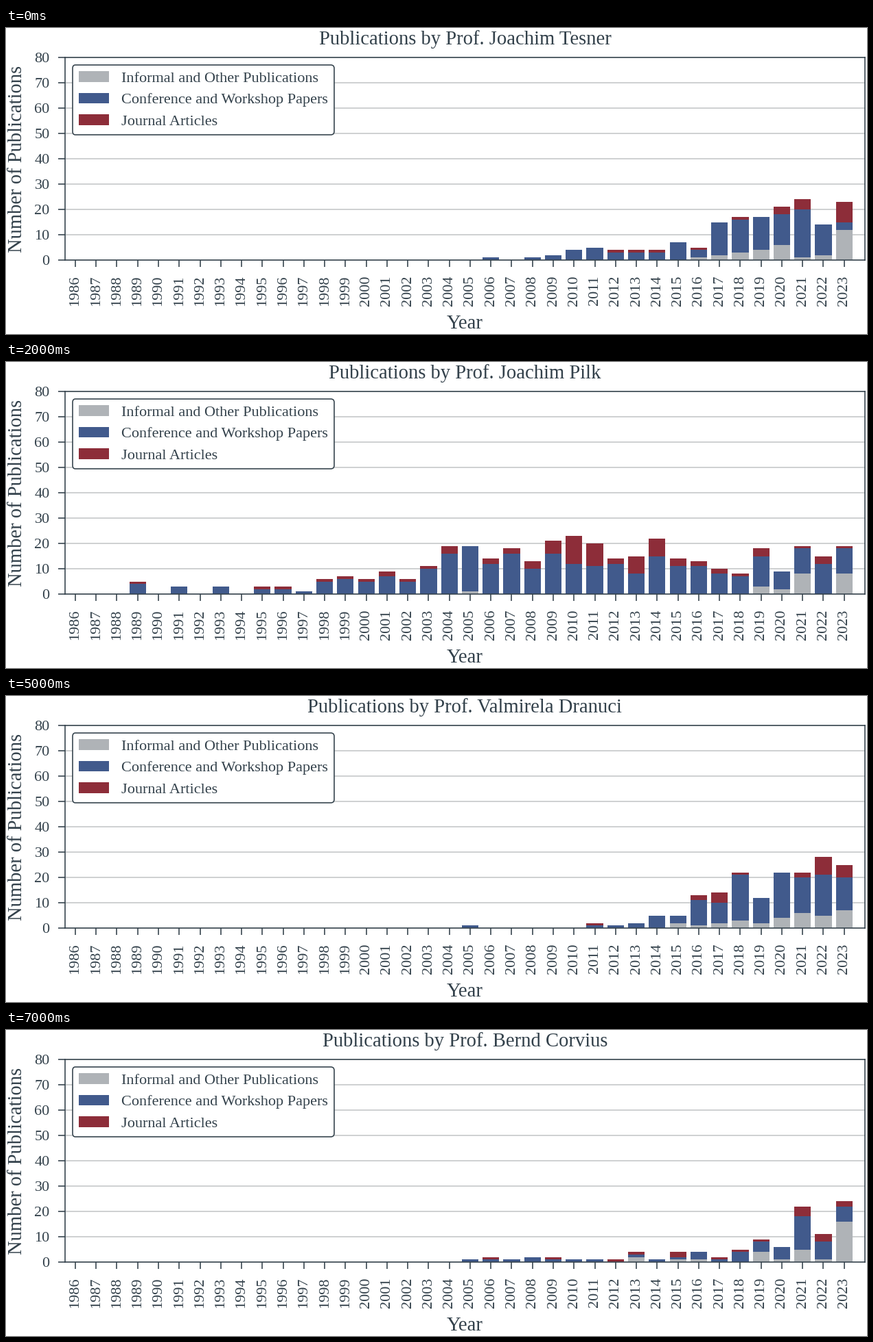
A matplotlib script that plays this animation: 1254 by 447 pixels, repeating every 8 s.

```python
import numpy as np
import matplotlib.pyplot as plt
from matplotlib.animation import FuncAnimation

W, H, DPI = 1254, 447, 64
PT = 72 / DPI  # points per pixel

DARK = "#33414b"
GRID = "#c4c6c8"
KINDS = {
    "Informal and Other Publications": "#afb3b7",
    "Conference and Workshop Papers": "#415a8c",
    "Journal Articles": "#8d2d39",
}
BIG, SMALL, LINE = 28.6 * PT, 22.25 * PT, 1.6 * PT

LEFT, RIGHT, TOP, BOTTOM = 85.8, 1251, 43, 339
YEARS = np.arange(1986, 2024)

people = []


def add(name, informal, conference, journal):
    """Store yearly counts; each list ends in the last year."""
    counts = np.zeros((3, len(YEARS)))
    for row, values in zip(counts, (informal, conference, journal)):
        row[len(YEARS) - len(values):] = values
    people.append((name, counts))


add("Joachim Tesner",
    [1, 2, 3, 4, 6, 1, 2, 12],
    [1, 0, 1, 2, 4, 5, 3, 3, 3, 7, 3, 13, 13, 13, 12, 19, 12, 3],
    [1, 1, 1, 0, 1, 0, 1, 0, 3, 4, 0, 8])

add("Joachim Olmering",
    [1, 0, 0, 1, 0],
    [1, 0, 1, 2, 1, 1, 2, 3, 2, 4, 3, 2, 4, 5, 3, 4, 4,
     5, 3, 4, 2, 3, 3, 2, 4, 2, 3, 2, 2, 1, 2, 1, 1, 0],
    [1, 0, 1, 0, 1, 1, 0, 1, 2, 1, 0, 1, 1, 2, 0, 1, 1, 0, 1, 1, 0, 1, 0])

add("Joachim Pilk",
    [1] + [0] * 13 + [3, 2, 8, 0, 8],
    [4, 0, 3, 0, 3, 0, 2, 2, 1, 5, 6, 5, 7, 5, 10, 16, 18, 12,
     16, 10, 16, 12, 11, 12, 8, 15, 11, 11, 8, 7, 12, 7, 10, 12, 10],
    [1, 0, 0, 0, 0, 0, 1, 1, 0, 1, 1, 1, 2, 1, 1, 3, 0, 2,
     2, 3, 5, 11, 9, 2, 7, 7, 3, 2, 2, 1, 3, 0, 1, 3, 1])

add("Diethelm Möllbrach",
    [2, 2, 1, 2, 13, 6, 4, 5, 9, 5, 17, 17, 21, 18, 17, 40],
    [1, 3, 5, 5, 6, 7, 8, 6, 5, 12, 15, 11, 11, 13, 9,
     16, 14, 11, 16, 14, 15, 13, 19, 21, 18, 21, 33, 45, 31],
    [1, 0, 1, 5, 2, 2, 4, 3, 4, 5, 6, 5, 4, 5, 2,
     5, 5, 2, 2, 5, 4, 11, 3, 4, 5, 5, 4, 4, 7])

add("Torsten Brelkoth",
    [6, 2, 1, 0, 5, 8, 4, 12],
    [1, 7, 9, 4, 5, 4, 6, 5, 7, 5, 4, 6, 9, 6],
    [1, 1, 0, 0, 1, 1, 1, 2, 2, 1, 3, 0])

add("Valmirela Dranuci",
    [2, 1, 2, 3, 2, 4, 6, 5, 7],
    [1, 0, 0, 0, 0, 0, 1, 1, 2, 5, 3, 10, 8, 18, 10, 18, 14, 16, 13],
    [1, 0, 0, 0, 0, 2, 4, 1, 0, 0, 2, 7, 5])

add("Ferdinand Hallbrod",
    [1, 1, 2, 2, 3, 4, 3, 6],
    [1, 1, 2, 2, 3, 3, 4, 4, 5, 6, 7, 8, 9, 8, 10],
    [1, 0, 1, 1, 0, 1, 2, 1, 2, 2, 3, 2])

add("Bernd Corvius",
    [2, 0, 1, 1, 0, 0, 4, 1, 5, 1, 16],
    [1, 1, 1, 2, 1, 1, 1, 0, 1, 1, 1, 3, 1, 4, 4, 5, 13, 7, 6],
    [1, 0, 0, 1, 0, 0, 1, 1, 0, 2, 0, 1, 1, 1, 0, 4, 3, 2])


plt.rcParams.update({
    "font.family": "Liberation Serif",
    "text.color": DARK,
    "axes.edgecolor": DARK,
    "axes.linewidth": LINE,
})

fig = plt.figure(figsize=(W / DPI, H / DPI), dpi=DPI, facecolor="white")
ax = fig.add_axes([LEFT / W, 1 - BOTTOM / H,
                   (RIGHT - LEFT) / W, (BOTTOM - TOP) / H])
ax.set(xlim=(1985.5, 2024), ylim=(0, 80), xticks=YEARS,
       yticks=range(0, 81, 10))
ax.set_axisbelow(True)
ax.grid(axis="y", color=GRID, linewidth=LINE)
ax.tick_params(length=10 * PT, pad=12.2 * PT, width=LINE, color=DARK,
               labelcolor=DARK, labelsize=SMALL)
ax.tick_params(axis="x", rotation=90)

bars = [ax.bar(YEARS, np.zeros(len(YEARS)), 0.8, color=color, label=kind)
        for kind, color in KINDS.items()]
legend = ax.legend(loc="upper left", fontsize=SMALL, framealpha=1,
                   edgecolor=DARK, facecolor="white")
legend.get_frame().set_linewidth(LINE)


def label(x, y, text="", rotation=0):
    """Centred text on a baseline, placed in pixels from the top left."""
    return fig.text(x / W, 1 - y / H, text, size=BIG, ha="center",
                    va="baseline", rotation=rotation, rotation_mode="anchor")


middle = (LEFT + RIGHT) / 2
title = label(middle, 24)
label(middle, 439, "Year")
label(23, (TOP + BOTTOM) / 2, "Number of Publications", 90)


def update(i):
    name, counts = people[i]
    title.set_text(f"Publications by Prof. {name}")
    base = np.zeros(len(YEARS))
    for group, values in zip(bars, counts):
        for bar, y, height in zip(group, base, values):
            bar.set(y=y, height=height, visible=height > 0)
        base = base + values
    return [title]


anim = FuncAnimation(fig, update, frames=len(people), interval=1000,
                     repeat=True, repeat_delay=0, blit=False)
plt.show()
```
